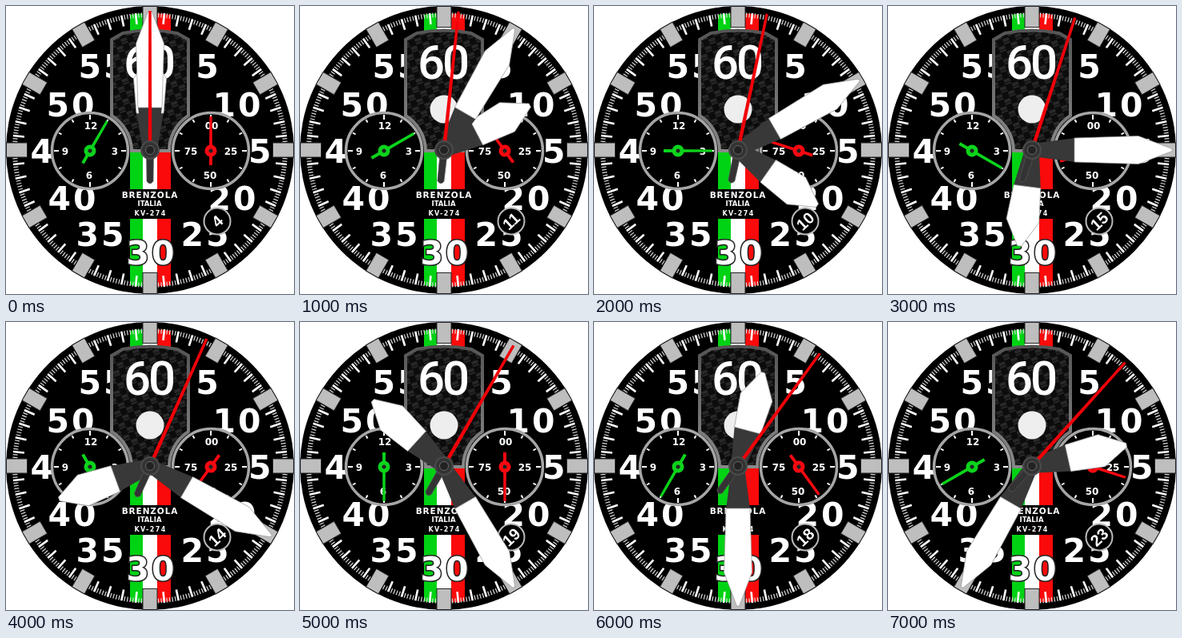
Write an HTML page that moves like this. It is 360 by 360 pixels and loops after 8 s.

```html
<!DOCTYPE html>
<html lang="en">
<head>
<meta charset="utf-8">
<title>Chronograph</title>
<style>
  html, body { margin: 0; width: 100%; height: 100%; overflow: hidden; background: #fff; }
  svg { display: block; width: 100vw; height: 100vh; }
  text { fill: #fff; text-anchor: middle; font-family: "DejaVu Sans", sans-serif; font-weight: 700; }
  .hour-num { font-size: 41px; letter-spacing: 3px; }
  .small { font-size: 12px; }
  .sixty { font: 500 60px Roboto, sans-serif; font-stretch: 75%; letter-spacing: -3px; }
  .date { font: 700 20px "Liberation Sans", sans-serif; }
</style>
</head>
<body>
<svg viewBox="0 0 360 360">
  <defs>
    <clipPath id="track"><circle cx="180" cy="180" r="171"/></clipPath>
    <pattern id="carbon" width="16" height="16" patternUnits="userSpaceOnUse" patternTransform="rotate(-20)">
      <rect width="16" height="16" fill="#0c0c0c"/>
      <path d="M0 1H8M0 3H8M8 9H16M8 11H16" stroke="#444"/>
      <path d="M0 6H8M8 14H16" stroke="#282828" stroke-width="2"/>
    </pattern>
    <linearGradient id="steel" x2="0" y2="1">
      <stop offset="0" stop-color="#555"/><stop offset="1" stop-color="#888"/>
    </linearGradient>
  </defs>

  <circle cx="180" cy="180" r="180"/>
  <g clip-path="url(#track)">
    <path fill="#00d214" d="M155 0h16v360h-16z"/>
    <path fill="#fff" d="M171 0h18v360h-18z"/>
    <path fill="#fa0a0a" d="M189 0h17v360h-17z"/>
  </g>
  <path d="M150 229H210V266H150Z"/>
  <g id="ticks"></g>
  <g id="numerals"></g>

  <path d="M132 42L146 34Q180 27 214 34L228 42V137A52 52 0 0 0 204 181H157A52 52 0 0 0 132 137Z"
        fill="url(#carbon)" stroke="url(#steel)" stroke-width="4"/>
  <text class="sixty" x="178" y="91">60</text>
  <circle cx="180" cy="129" r="17.5" fill="#eee"/>

  <text x="180" y="240" font-size="10.5" letter-spacing=".9">BRENZOLA</text>
  <text x="179.5" y="249.5" font-size="8.5">ITALIA</text>
  <text x="180.5" y="262" font-size="8" letter-spacing="1.4">KV-274</text>

  <g id="dials"></g>

  <g transform="translate(264 269) rotate(-43)">
    <circle r="16.5" stroke="#bbb" stroke-width="2"/>
    <text id="date" class="date" y="7"></text>
  </g>

  <g id="hour">
    <path d="M-9 0L-17-47H17L9 0Z" fill="#383838"/>
    <path d="M-17-46L-20.5-89L-2.5-121H2.5L20.5-89L17-46Z" fill="#fff" stroke="#999" stroke-width=".7"/>
  </g>
  <g id="minute">
    <path d="M-8 0L-15-54H15L8 0Z" fill="#383838"/>
    <path d="M-15-53L-17.5-133L-1.5-175H1.5L17.5-133L15-53Z" fill="#fff" stroke="#999" stroke-width=".7"/>
  </g>
  <g id="second">
    <path d="M-4.500 0L-4 39Q0 45 4 39L4.500 0Z" fill="#333" stroke="#555" stroke-width=".7"/>
    <path d="M-2.300 0L-1.700-174H1.700L2.300 0Z" fill="#f00008"/>
  </g>
  <circle cx="180" cy="180" r="11" fill="#333" stroke="#4a4a4a" stroke-width="2"/>
  <circle cx="180" cy="180" r="5.500" fill="#222" stroke="#666"/>
</svg>

<script>
const $ = id => document.getElementById(id);
const range = n => [...Array(n).keys()];
const turn = (deg, x = 180, y = 180) => `translate(${x} ${y}) rotate(${deg})`;
const label = (s, x, y, cls) => `<text class="${cls}" x="${x}" y="${y}">${s}</text>`;
const spoke = (deg, r1, r2, w, color, x, y) =>
  `<path transform="${turn(deg, x, y)}" d="M0 ${-r1}V${-r2}" stroke="${color}" stroke-width="${w}"/>`;

// Minute track, then hour blocks
$('ticks').innerHTML =
  range(300).map(i => i % 5
    ? spoke(i * 1.2, 166, 172, 1.2, '#ddd')
    : spoke(i * 1.2, 158, 172, 2.6, '#fff')).join('') +
  range(12).map(i =>
    spoke(i * 30, 153, 180, 19, '#222') + spoke(i * 30, 154, 179, 17, '#bebebe')).join('');

// Numerals: right value, its x, left value, its x, shared baseline
const rows = [
  [5, 253, 55, 122, 90], [10, 290, 50, 82, 138], [15, 303, 45, 62, 196],
  [20, 284, 40, 84, 255], [25, 250, 35, 119, 300]];
$('numerals').innerHTML = rows.map(([r, rx, l, lx, y]) =>
  label(r, rx, y, 'hour-num') + label(l, lx, y, 'hour-num')).join('') +
  '<g stroke="#222" stroke-width="3" paint-order="stroke">' + label(30, 182, 323, 'hour-num') + '</g>';

function dial(id, x, y, color, [top, right, bottom, left], side) {
  return `<circle cx="${x}" cy="${y}" r="47.5" stroke="#a6a6a6" stroke-width="3.5"/>` +
    range(12).map(i => spoke(i * 30, i % 3 ? 41 : 39, 45, 2, '#fff', x, y)).join('') +
    label(top, x + 1, y - 27, 'small') + label(bottom, x - 1, y + 35, 'small') +
    label(right, x + side, y + 4.5, 'small') + label(left, x - side, y + 4.5, 'small') +
    `<g id="${id}"><path d="M-2 18L-1.6-43H1.6L2 18Z" fill="${color}"/>
     <circle r="7.5" fill="${color}"/><circle r="2.5" fill="#222"/></g>`;
}
$('dials').innerHTML =
  dial('green', 105, 181, '#0cd41c', [12, 3, 6, 9], 31) +
  dial('red', 256, 181, '#fa0810', ['00', 25, 50, 75], 25);

const dates = [4, 11, 10, 15, 14, 19, 18, 23];

function pose(k) {
  const set = (id, deg, x, y) => $(id).setAttribute('transform', turn(deg, x, y));
  set('second', 6 * k);
  set('minute', 30 * k);
  set('hour', 62.5 * k);
  set('green', 30 + 30 * k, 105, 181);
  set('red', -36 * k, 256, 181);
  $('date').textContent = dates[k];
}

const start = performance.now();
let shown = -1;
function tick() {
  const k = Math.floor((performance.now() - start) / 1000) % 8;
  if (k !== shown) pose(shown = k);
  requestAnimationFrame(tick);
}
tick();
</script>
</body>
</html>
```
